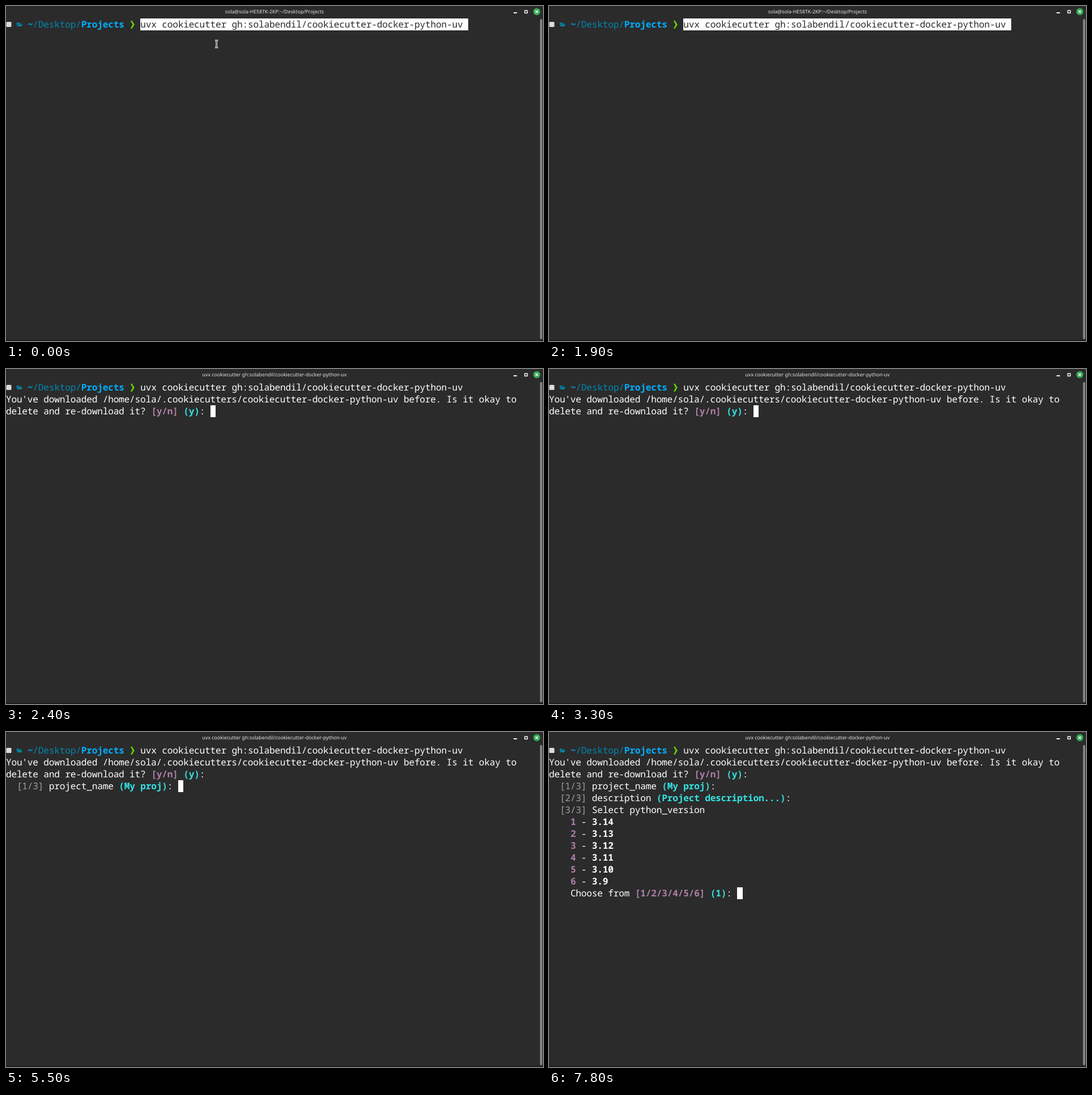
Animation of 948 by 591 pixels, one loop 8 s. Source, as an HTML page:

```html
<!DOCTYPE html>
<html lang="en">
<head>
<meta charset="utf-8">
<title>Terminal</title>
<style>
  html, body { margin: 0; width: 100%; height: 100%; overflow: hidden; background: #2b2b2b; }
  svg { display: block; }
  text { white-space: pre; text-rendering: geometricPrecision; }
  #screen text {
    font: 500 16.2px "Noto Sans Mono", "DejaVu Sans Mono", monospace;
    letter-spacing: -0.226px;
    fill: #fff;
  }
  #screen .b { font-weight: 700; }
  #screen .dim { fill: #9f9f9f; }
  #screen .dark { fill: #2b2b2b; }
  #screen .dir { fill: #0087af; }
  #screen .here { fill: #00afff; font-weight: 700; }
  #screen .pick { fill: #ad7fa8; font-weight: 700; }
  #screen .hint { fill: #34e2e2; font-weight: 700; }
  #screen .title {
    font: 8.74px "Noto Sans", "Open Sans", sans-serif;
    letter-spacing: 0;
    fill: #e4e4e4;
    text-anchor: middle;
  }
  rect { shape-rendering: crispEdges; }
  .soft { shape-rendering: auto; }
</style>
</head>
<body>
<svg width="948" height="591" viewBox="0 0 948 591">
  <rect width="948" height="591" fill="#2b2b2b"/>
  <path d="M0 0H2L0 2Z" fill="#111"/>
  <rect class="soft" y="589.5" width="948" height="1.5" fill="#171717"/>
  <rect class="soft" x="942.7" y="23" width="4" height="565" rx="2" fill="#868686"/>

  <!-- window buttons -->
  <rect x="896" y="11" width="6" height="2" fill="#f2f2f2"/>
  <rect class="soft" x="915.8" y="8" width="4.6" height="4.4" fill="none" stroke="#f2f2f2" stroke-width="1.5"/>
  <circle cx="937" cy="10" r="6.2" fill="#35a854"/>
  <path d="M934.7 7.7L939.3 12.3M939.3 7.7L934.7 12.3" stroke="#fff" stroke-width="1.4"/>

  <!-- prompt symbols -->
  <rect class="soft" x="0.5" y="28" width="9" height="9" rx="1.5" fill="#dcdcdc"/>
  <path d="M19 35V29.2H22.2L23.2 30.3H26.6V31.6H21.6Z M19.4 36L22 32.3H29L26.6 36Z" fill="#0087af"/>
  <path d="M219.8 26H222.6L226.8 32.8L222.6 39.8H219.8L223.6 32.8Z" fill="#5fd700"/>

  <g id="screen"></g>
  <rect id="cursor" width="9.5" height="21" fill="#fff"/>
  <g id="pointer" fill="none">
    <path d="M-2.6 -6H-1.2L0 -5L1.2 -6H2.6M0 -5V5M-2.6 6H-1.2L0 5L1.2 6H2.6" stroke="#f4f4f4" stroke-width="2.8"/>
    <path d="M-2.4 -6H-1.2L0 -5L1.2 -6H2.4M0 -5V5M-2.4 6H-1.2L0 5L1.2 6H2.4" stroke="#222" stroke-width="0.9"/>
  </g>
</svg>
<script>
const LOOP = 8000, CELL = 9.494, ROW = 21, TOP = 22;
const ENTER = 2100, ASK = 2400, CONFIRM = 3800, NAME = 5500, DESC = 6500, VERSION = 7800;
const COMMAND = "uvx cookiecutter gh:solabendil/cookiecutter-docker-python-uv";

const screen = document.getElementById("screen");
const cursor = document.getElementById("cursor");
const pointer = document.getElementById("pointer");
const timed = [];

function add(tag, attrs, from = 0, to = LOOP) {
  const el = document.createElementNS("http://www.w3.org/2000/svg", tag);
  for (const key in attrs) el.setAttribute(key, attrs[key]);
  screen.append(el);
  timed.push({ el, from, to });
  return el;
}

function put(row, col, text, cls = "", from = 0, to = LOOP) {
  const attrs = { x: col * CELL - 0.1, y: TOP + row * ROW + 16, class: cls };
  add("text", attrs, from, to).textContent = text;
}

function windowTitle(text, from, to) {
  add("text", { x: 474, y: 13, class: "title" }, from, to).textContent = text;
}

windowTitle("sola@sola-HE58TK-2KP:~/Desktop/Projects", 0, ENTER);
windowTitle(COMMAND, ENTER, LOOP);

put(0, 4, "~", "here");
put(0, 5, "/Desktop/", "dir");
put(0, 14, "Projects", "here");
add("rect", { x: 25 * CELL, y: TOP, width: 60 * CELL, height: ROW, fill: "#fff" }, 0, ENTER);
put(0, 25, COMMAND, "dark", 0, ENTER);
put(0, 25, COMMAND, "", ENTER);

put(1, 0, "You've downloaded /home/sola/.cookiecutters/cookiecutter-docker-python-uv before. Is it okay to", "", ASK);
put(2, 0, "delete and re-download it?", "", ASK);
put(2, 27, "[y/n]", "pick", ASK);
put(2, 33, "(y)", "hint", ASK);
put(2, 36, ":", "", ASK);

put(3, 2, "[1/3]", "dim", NAME);
put(3, 8, "project_name", "", NAME);
put(3, 21, "(My proj)", "hint", NAME);
put(3, 30, ":", "", NAME);

put(4, 2, "[2/3]", "dim", DESC);
put(4, 8, "description", "", DESC);
put(4, 20, "(Project description...)", "hint", DESC);
put(4, 44, ":", "", DESC);

put(5, 2, "[3/3]", "dim", VERSION);
put(5, 8, "Select python_version", "", VERSION);
for (let i = 1; i <= 6; i++) {
  put(5 + i, 4, String(i), "pick", VERSION);
  put(5 + i, 6, "-", "", VERSION);
  put(5 + i, 8, "3." + (15 - i), "b", VERSION);
}
put(12, 4, "Choose from", "", VERSION);
put(12, 16, "[1/2/3/4/5/6]", "pick", VERSION);
put(12, 30, "(1)", "hint", VERSION);
put(12, 33, ":", "", VERSION);

// [time, row, column]
const cursorStops = [
  [0, 0, 85], [ENTER, 1, 0], [ASK, 2, 38], [CONFIRM, 3, 0],
  [NAME, 3, 32], [DESC, 4, 46], [VERSION, 12, 35]
];
// Each key press restarts the blink; the first one lies before the loop.
const blinkStarts = [[-500], [ENTER], [CONFIRM], [DESC]];
// [time, x, y]
const pointerStops = [[0, 371.7, 67], [300, 530, 86], [400, 752, 108.5]];

const latest = (list, t) => list.filter(([time]) => time <= t).pop();
const show = (el, on) => { el.style.visibility = on ? "visible" : "hidden"; };

function draw(t) {
  for (const { el, from, to } of timed) show(el, t >= from && t < to);

  const [, row, col] = latest(cursorStops, t);
  cursor.setAttribute("x", col * CELL);
  cursor.setAttribute("y", TOP + row * ROW);
  const [blinkStart] = latest(blinkStarts, t);
  show(cursor, Math.floor((t - blinkStart) / 600) % 2 === 0);

  const [, x, y] = latest(pointerStops, t);
  pointer.setAttribute("transform", `translate(${x} ${y})`);
  show(pointer, t < 500);
}

const begin = performance.now();
function tick() {
  draw((performance.now() - begin) % LOOP);
  requestAnimationFrame(tick);
}
tick();
</script>
</body>
</html>
```
